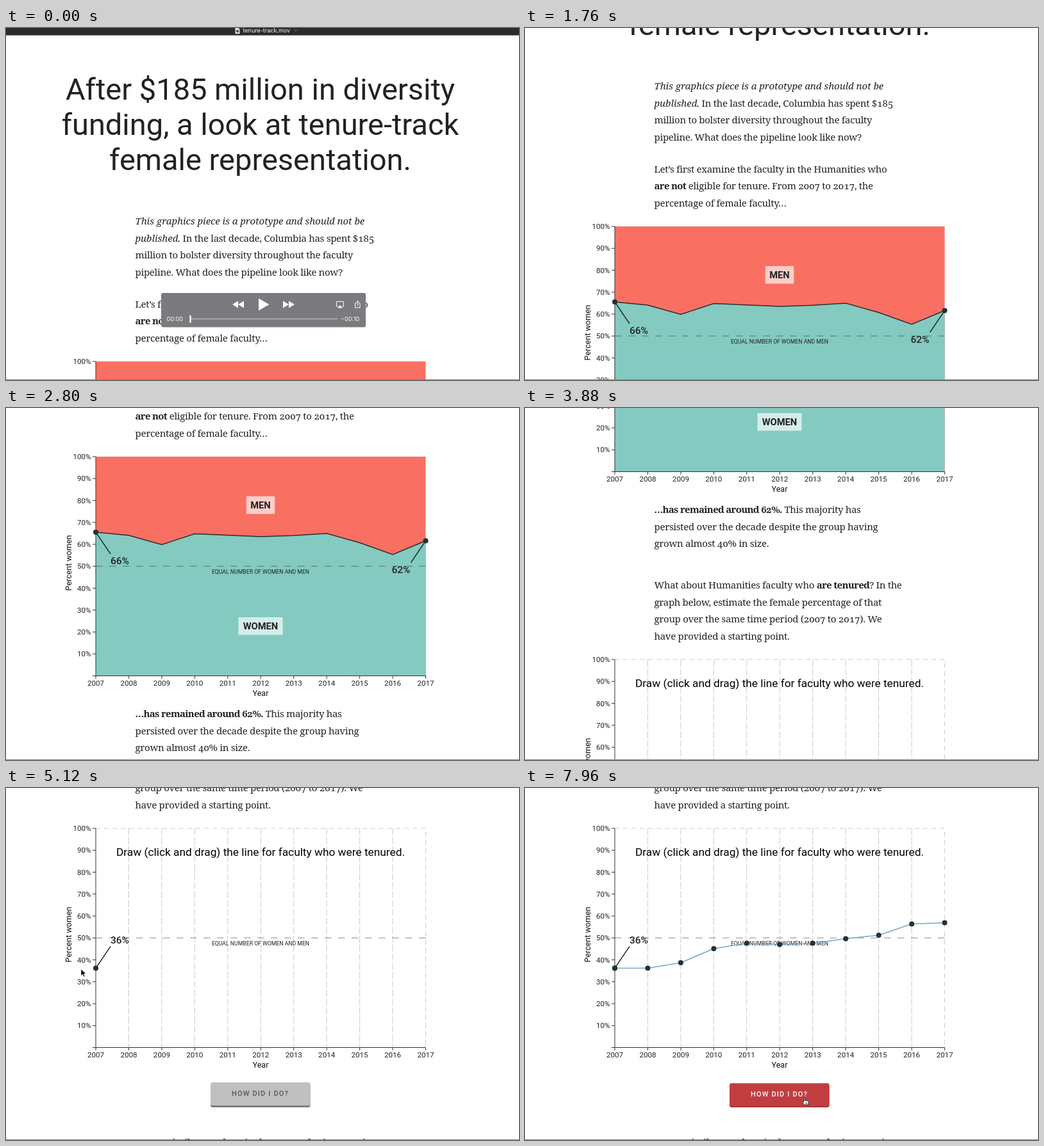
Animation of 800 by 550 pixels, one loop 8 s. Source, as an HTML page:

```html
<!DOCTYPE html>
<html lang="en">
<head>
<meta charset="utf-8">
<title>Tenure-track representation</title>
<style>
html, body { margin: 0; width: 100%; height: 100%; overflow: hidden; background: #fff; }
svg { display: block; width: 800px; height: 550px; font-family: Roboto, sans-serif; fill: #222; }
.title { font-size: 47px; text-anchor: middle; }
.body { font: 15px "Noto Serif", serif; letter-spacing: -.3px; font-variant-numeric: oldstyle-nums; }
.body .i { font-style: italic; letter-spacing: -.05px; }
.body .b { font-weight: 700; letter-spacing: -.7px; }
.tick { font-size: 11.6px; }
.axis-name { font-size: 12.5px; text-anchor: middle; fill: #111; }
.half { font-size: 8.7px; text-anchor: middle; }
.tag { font-size: 14.7px; font-weight: 700; text-anchor: middle; }
.value { font-size: 15.5px; font-weight: 500; text-anchor: middle; }
.hint { font-size: 17.3px; text-anchor: middle; fill: #000; }
.end { text-anchor: end; }
.mid { text-anchor: middle; }
.line { fill: none; stroke: #26302f; stroke-width: 1.5; }
.axis { fill: none; stroke: #333; }
.grid { fill: none; stroke: #ccc; }
.dot { fill: #24312f; }
.button text { font-size: 11px; font-weight: 500; letter-spacing: 1.15px; }
.player text, .bar text { font: 9px Inter, sans-serif; fill: #fff; }
</style>
</head>
<body>
<svg viewBox="0 0 800 550">
  <g id="page">
    <g class="title">
      <text x="396.5" y="112">After $185 million in diversity</text>
      <text x="396.5" y="167">funding, a look at tenure-track</text>
      <text x="396.5" y="222">female representation.</text>
    </g>
    <g class="body" id="copy"></g>
    <g id="faculty" transform="translate(0 521)"></g>
    <g id="guess" transform="translate(0 1157)"></g>
    <g class="button">
      <rect id="edge" x="319" y="1557" width="155.5" height="36" rx="3"/>
      <g id="face">
        <rect x="319" y="1554" width="155.5" height="36" rx="3"/>
        <text x="352" y="1575">HOW DID I DO?</text>
      </g>
    </g>
  </g>
  <rect y="549" width="800" height="1" fill="#858585"/>

  <g id="chrome">
    <g class="bar">
      <rect width="800" height="11.5" fill="#2b2b2b"/>
      <path d="M357.500 0h5l2 2v7h-7z" fill="#e8e8e8"/>
      <circle cx="361" cy="5" r="2.300" fill="#555"/>
      <text x="369.500" y="7">tenure-track.mov</text>
      <path d="M449.500 2.500l2.200 2.200l2.200-2.200" fill="none" stroke="#888"/>
    </g>
    <g class="player" fill="#fff">
      <rect x="242" y="414" width="319" height="53.500" rx="3" fill="#7b7a7e"/>
      <path d="M362 426.500v11l-9-5.500zM371 426.500v11l-9-5.500zM394 422.500l16.500 9.500l-16.500 9.500zM432 426.500l9 5.500l-9 5.500zM441 426.500l9 5.500l-9 5.500z"/>
      <path d="M518 435h-2.500v-7.500h11v7.500h-2.500M546.500 430h-2v7h7.500v-7h-2M548.300 434v-7.500M546.200 428.500l2.100-2.200l2.100 2.200" fill="none" stroke="#fff"/>
      <path d="M521 433l3.800 4.500h-7.600z"/>
      <text x="250.500" y="458">00:00</text>
      <text x="522" y="458">−00:10</text>
      <rect x="287" y="453.500" width="230" height="2" fill="#aaa9ad"/>
      <rect x="286.300" y="449" width="2.400" height="11.500"/>
    </g>
  </g>

  <g id="cursor">
    <path id="arrow" d="M0 0v10.500l2.500-2.300l1.800 4l1.800-.8l-1.700-3.900h3.400z" fill="#000" stroke="#fff" stroke-width=".7"/>
    <path id="hand" d="M-.9 .6q.9-1.200 1.800 0v4l4.400 1q1.300.5 1 2l-.8 3.900h-6l-3-4.200q-.5-1.600 1-1.100l1.600 1.200zM1.700 8v2.200M3.500 8v2.200" fill="#fff" stroke="#000" stroke-width=".8"/>
  </g>
</svg>
<script>
const LOOP = 8000, LEFT = 140, WIDTH = 514.5, HEIGHT = 342.5, STEP = WIDTH / 10;
const $ = id => document.getElementById(id);
const yearX = i => LEFT + i * STEP;
const range = n => [...Array(n).keys()];
const clamp = (v, lo, hi) => Math.min(hi, Math.max(lo, v));
const lerp = (a, b, p) => a + (b - a) * p;

const text = (x, y, cls, s, extra = '') => `<text x="${x}" y="${y}" class="${cls}" ${extra}>${s}</text>`;
const path = (d, cls, extra = '') => `<path d="${d}" class="${cls}" ${extra}/>`;
const dot = (x, y) => `<circle cx="${x}" cy="${y}" r="4" class="dot"/>`;
const polyline = ys => 'M' + ys.map((y, i) => `${yearX(i)} ${y}`).join('L');

// Body copy: first baseline, then lines 26.5 px apart
const bold = s => `<tspan class="b">${s}</tspan>`;
const italic = s => `<tspan class="i">${s}</tspan>`;
const paragraphs = [
  [307, italic('This graphics piece is a prototype and should not be'),
    italic('published.') + ' In the last decade, Columbia has spent $185',
    'million to bolster diversity throughout the faculty',
    'pipeline. What does the pipeline look like now?'],
  [436.5, 'Let’s first examine the faculty in the Humanities who',
    bold('are not') + ' eligible for tenure. From 2007 to 2017, the',
    'percentage of female faculty…'],
  [928, bold('…has remained around 62%.') + ' This majority has',
    'persisted over the decade despite the group having',
    'grown almost 40% in size.'],
  [1046, 'What about Humanities faculty who ' + bold('are tenured') + '? In the',
    'graph below, estimate the female percentage of that',
    'group over the same time period (2007 to 2017). We',
    'have provided a starting point.'],
  [1652.5, bold('We see similar numbers in the Men and Science series')]
];
$('copy').innerHTML = paragraphs.map(([y, ...lines]) =>
  lines.map((s, i) => text(201.5, y + i * 26.5, '', s)).join('')).join('');

function axes() {
  const percents = range(10).map(i => {
    const y = i * HEIGHT / 10;
    return text(132.5, y + 4, 'tick end', `${100 - i * 10}%`) + path(`M135 ${y}H${LEFT}`, 'axis');
  });
  const years = range(11).map(i =>
    text(yearX(i), HEIGHT + 15, 'tick mid', 2007 + i) + path(`M${yearX(i)} ${HEIGHT}v4.5`, 'axis'));
  return percents.join('') + years.join('') +
    path(`M${LEFT} 0V${HEIGHT}M135 ${HEIGHT}H${LEFT + WIDTH}`, 'axis') +
    text(397, HEIGHT + 31, 'axis-name', 'Year') +
    text(0, 0, 'axis-name', 'Percent women', 'transform="translate(102 166) rotate(-90)"');
}

const halfLine = color =>
  path(`M${LEFT} 171.2h${WIDTH}`, '', `stroke="${color}" stroke-dasharray="10.5 10.5"`) +
  text(397, 182.5, 'half', 'EQUAL NUMBER OF WOMEN AND MEN');

const tag = (y, w, s) =>
  `<rect x="${397 - w / 2}" y="${y}" width="${w}" height="27.5" fill="#fff" fill-opacity=".66"/>` +
  text(397, y + 19, 'tag', s);

const callout = (x, y, dx, dy, tx, ty, s) =>
  path(`M${x} ${y}l${dx} ${dy}`, 'line', 'stroke-width="1.2"') + dot(x, y) + text(tx, ty, 'value', s);

const women = [118, 123, 137.5, 120.5, 122.7, 125, 123.2, 120, 134.5, 153, 131.5];
$('faculty').innerHTML =
  `<rect x="${LEFT}" width="${WIDTH}" height="${HEIGHT}" fill="#f97063"/>` +
  path(`${polyline(women)}V${HEIGHT}H${LEFT}z`, '', 'fill="#84cac1"') +
  halfLine('#4d7470') + axes() + path(polyline(women), 'line') +
  tag(62, 44.5, 'MEN') + tag(251, 69, 'WOMEN') +
  callout(LEFT, women[0], 23, 34, 177.5, 168, '66%') +
  callout(LEFT + WIDTH, women[10], -23, 34, 616, 181.5, '62%');

const drawn = [218.5, 218.5, 210, 188, 179.5, 181.5, 179.5, 172.5, 167, 149.5, 147.5];
$('guess').innerHTML =
  path(range(9).map(i => `M${yearX(i + 1)} 0V${HEIGHT}`).join(''), 'grid', 'stroke-dasharray="11 3"') +
  path(`M${LEFT} 0h${WIDTH}v${HEIGHT}`, 'grid', 'stroke-dasharray="7 6"') +
  halfLine('#8a8a8a') + axes() +
  text(397, 43, 'hint', 'Draw (click and drag) the line for faculty who were tenured.') +
  path('', '', 'id="stroke" fill="none" stroke="#78abc9" stroke-width="1.7"') +
  '<g id="dots"></g>' +
  callout(LEFT, drawn[0], 23, -34, 177.5, 179.5, '36%');

// Monotone cubic through [time, offset] knots
const scrollKeys = [[880, 0], [1360, 100], [2240, 343], [2800, 445], [3880, 764], [4800, 1094]];
const rate = i => (scrollKeys[i + 1][1] - scrollKeys[i][1]) / (scrollKeys[i + 1][0] - scrollKeys[i][0]);
const slopes = scrollKeys.map((_, i) => {
  if (i === 0 || i === scrollKeys.length - 1) return 0;
  const a = rate(i - 1), b = rate(i);
  return 2 * a * b / (a + b);
});
function scrollAt(t) {
  t = clamp(t, scrollKeys[0][0], scrollKeys.at(-1)[0]);
  const i = clamp(scrollKeys.findIndex(k => k[0] >= t) - 1, 0, scrollKeys.length - 2);
  const [t0, a] = scrollKeys[i], [t1, b] = scrollKeys[i + 1];
  const h = t1 - t0, p = (t - t0) / h, q = 1 - p;
  return a * q * q * (1 + 2 * p) + b * p * p * (3 - 2 * p) +
    h * p * q * (slopes[i] * q - slopes[i + 1] * p);
}

const DRAW_START = 5440, DRAW_END = 6920, CHART_Y = 63;
const cursorKeys = [[4800, 768, 330], [5080, 117, 283], [5200, 117, 283], [DRAW_START, LEFT, 281],
  [DRAW_END, LEFT + WIDTH, 211], [7480, 428, 479], [7960, 436, 483.5]];

// Height of the pen at a position counted in years
function penY(u) {
  const s = clamp(u - .5, 0, 10), i = Math.min(9, Math.floor(s));
  return lerp(drawn[i], drawn[i + 1], s - i);
}

function cursorAt(t) {
  if (t >= DRAW_START && t <= DRAW_END) {
    const u = 10 * (t - DRAW_START) / (DRAW_END - DRAW_START);
    return [yearX(u), penY(u) + CHART_Y];
  }
  const i = cursorKeys.findIndex(k => k[0] > t);
  if (i < 0) return cursorKeys.at(-1).slice(1);
  if (i === 0) return cursorKeys[0].slice(1);
  const [t0, x0, y0] = cursorKeys[i - 1], [t1, x1, y1] = cursorKeys[i];
  const p = (t - t0) / (t1 - t0), e = p * p * (3 - 2 * p);
  return [lerp(x0, x1, e), lerp(y0, y1, e)];
}

function render(t) {
  $('chrome').setAttribute('opacity', 1 - clamp((t - 60) / 540, 0, 1));
  $('page').setAttribute('transform', `translate(0 ${-Math.round(scrollAt(t))})`);

  const [x, y] = cursorAt(t);
  const onButton = t > DRAW_END && y > 461;
  $('cursor').setAttribute('transform', `translate(${x} ${y})`);
  $('cursor').setAttribute('visibility', t < cursorKeys[0][0] ? 'hidden' : 'visible');
  $('arrow').style.display = onButton ? 'none' : '';
  $('hand').style.display = onButton ? '' : 'none';

  const u = 10 * clamp((t - DRAW_START) / (DRAW_END - DRAW_START), 0, 1);
  const count = t < DRAW_START ? 0 : Math.floor(u + .5) + 1;
  const points = range(count).map(i => i < 10 ? penY(Math.min(u, i + .5)) : drawn[10]);
  $('stroke').setAttribute('d', count > 1 ? polyline(points) : '');
  $('dots').innerHTML = points.map((py, i) => dot(yearX(i), py)).join('');

  const ready = count === 11;
  const [edge, face, label] = ready ? ['#a63335', '#c13e40', '#fff'] : ['#808080', '#c0c0c0', '#555'];
  $('edge').setAttribute('fill', edge);
  $('face').children[0].setAttribute('fill', face);
  $('face').children[1].setAttribute('fill', label);
  $('face').setAttribute('transform', `translate(0 ${onButton ? 1.3 : 0})`);
}

let start;
function tick(now) {
  start ??= now;
  render((now - start) % LOOP);
  requestAnimationFrame(tick);
}
render(0);
requestAnimationFrame(tick);
</script>
</body>
</html>
```
